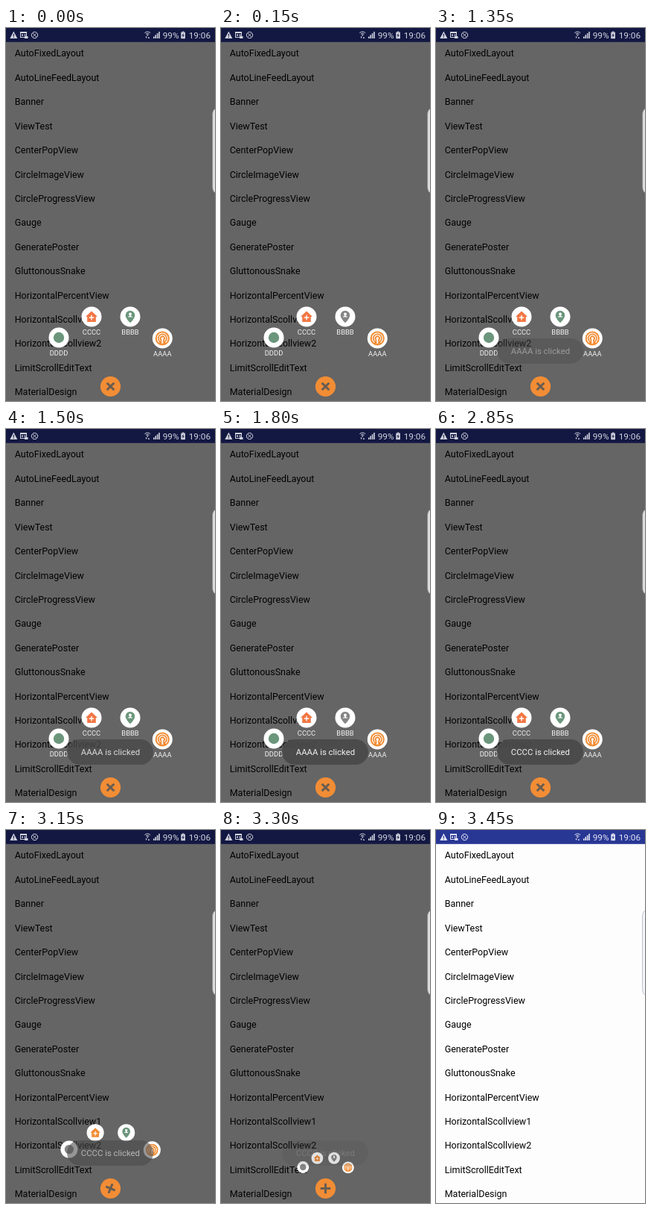
An HTML page with a canvas that plays this animation: 281x500 px, repeating every 3.75 s.

```html
<!DOCTYPE html>
<html lang="en">
<head>
<meta charset="utf-8">
<title>Arc menu</title>
<style>
  html, body { margin: 0; width: 100%; height: 100%; overflow: hidden; background: #666; }
  canvas { display: block; width: 281px; height: 500px; }
</style>
</head>
<body>
<canvas id="stage"></canvas>
<script>
const W = 281, H = 500, LOOP = 3750, TICK = 150;
const FONT = 'Roboto, sans-serif';
const ORANGE = '#f28d35', CORAL = '#f27643', GREEN = '#6b967c', GREY = '#858585';
const ROWS = ['AutoFixedLayout', 'AutoLineFeedLayout', 'Banner', 'ViewTest', 'CenterPopView',
  'CircleImageView', 'CircleProgressView', 'Gauge', 'GeneratePoster', 'GluttonousSnake',
  'HorizontalPercentView', 'HorizontalScollview1', 'HorizontalScollview2',
  'LimitScrollEditText', 'MaterialDesign'];
const HUB = { x: 140.5, y: 480.5 };
const ITEMS = [
  { label: 'DDDD', x: 71, y: 415, icon: drawDot },
  { label: 'CCCC', x: 115, y: 387, icon: drawHouse },
  { label: 'BBBB', x: 167, y: 387, icon: drawPin },
  { label: 'AAAA', x: 210.3, y: 416, icon: drawBroadcast }
];

const canvas = document.getElementById('stage');
const ratio = window.devicePixelRatio || 1;
canvas.width = Math.round(W * ratio);
canvas.height = Math.round(H * ratio);
const ctx = canvas.getContext('2d');

const clamp = v => Math.max(0, Math.min(1, v));
const mix = (a, b, k) => a + (b - a) * k;

function text(str, x, y, size, color, align = 'left') {
  ctx.font = `${size}px ${FONT}`;
  ctx.textAlign = align;
  ctx.fillStyle = color;
  ctx.fillText(str, x, y);
}

function disc(x, y, r, color) {
  ctx.fillStyle = color;
  ctx.beginPath();
  ctx.arc(x, y, r, 0, Math.PI * 2);
  ctx.fill();
}

function arc(x, y, r, from, to) {
  ctx.beginPath();
  ctx.arc(x, y, r, from, to);
  ctx.stroke();
}

function box(x, y, w, h, color) {
  ctx.fillStyle = color;
  ctx.fillRect(x, y, w, h);
}

function polygon(points, color) {
  ctx.fillStyle = color;
  ctx.beginPath();
  points.forEach(([x, y]) => ctx.lineTo(x, y));
  ctx.closePath();
  ctx.fill();
}

function cross(size, width, color) {
  box(-size, -width / 2, size * 2, width, color);
  box(-width / 2, -size, width, size * 2, color);
}

// Item icons are drawn around their own centre.
function drawDot(state) {
  disc(0, 0, 7.2, state.progress < 1 ? GREY : GREEN);
}

function drawHouse(state) {
  const color = state.progress < 1 ? ORANGE : CORAL;
  polygon([[0, -7.5], [8, 0], [5.8, 0], [5.8, 7], [-5.8, 7], [-5.8, 0], [-8, 0]], color);
  ctx.save();
  ctx.translate(0, 1.2);
  cross(3.3, 1.4, '#fff');
  ctx.restore();
}

function drawPin(state) {
  const color = state.greyPin ? GREY : GREEN;
  ctx.fillStyle = color;
  ctx.beginPath();
  ctx.arc(0, -1.8, 6.3, Math.PI * 0.85, Math.PI * 2.15);
  ctx.quadraticCurveTo(4, 4.8, 0, 8.2);
  ctx.quadraticCurveTo(-4, 4.8, -5.6, 1);
  ctx.fill();
  disc(0, -3.6, 1.9, '#fff');
  box(-0.8, -3, 1.6, 3, '#fff');
  ctx.fillStyle = '#fff';
  ctx.beginPath();
  ctx.ellipse(0, 0.4, 3.2, 1.5, 0, Math.PI, 0);
  ctx.fill();
}

function drawBroadcast() {
  disc(0, 0, 9.6, ORANGE);
  ctx.strokeStyle = '#fff';
  ctx.lineWidth = 1.1;
  arc(0, 0, 7, Math.PI * 0.7, Math.PI * 2.3);
  arc(0, 0, 4.2, Math.PI * 0.72, Math.PI * 2.28);
  disc(0, 0, 1.7, '#fff');
  box(-0.9, 1, 1.8, 6, '#fff');
}

function drawStatusBar(open) {
  const bar = open ? '#121842' : '#283694';
  const ink = open ? '#d2d4df' : '#e3e6f5';
  box(0, 0, W, 18.8, bar);

  polygon([[10.3, 4.6], [15.3, 14], [5.3, 14]], ink);
  box(9.7, 7.8, 1.2, 3, bar);
  box(9.7, 11.6, 1.2, 1.2, bar);

  ctx.strokeStyle = ink;
  ctx.lineWidth = 1;
  ctx.strokeRect(19.5, 5.5, 8, 7);
  box(19, 5, 9, 2, ink);
  box(21, 8.5, 2, 2, ink);
  box(24.5, 8.5, 2, 2, ink);
  box(25, 11, 4.5, 3, ink);

  arc(38.5, 9.5, 4.2, 0, Math.PI * 2);
  ctx.beginPath();
  ctx.moveTo(36, 7);
  ctx.lineTo(41, 12);
  ctx.moveTo(36.3, 11.5);
  ctx.lineTo(40.6, 7.5);
  ctx.stroke();

  [5.5, 3.2].forEach(r => arc(190.3, 10.5, r, Math.PI * 1.25, Math.PI * 1.75));
  disc(190.3, 9.6, 1, ink);
  polygon([[187.5, 11.5], [189.8, 11.5], [188.6, 14]], ink);
  polygon([[190.8, 14], [193.1, 14], [191.9, 11.5]], ink);

  for (let i = 0; i < 4; i++) {
    const h = 2.5 + i * 2.2;
    box(198 + i * 2.4, 14 - h, 1.6, h, ink);
  }
  text('99%', 210.7, 13.8, 11.8, ink);
  box(235.3, 5.6, 5.6, 8.6, ink);
  box(236.8, 4.5, 2.6, 1.2, ink);
  polygon([[238.7, 6.8], [236.4, 10.2], [237.9, 10.2], [237.4, 13], [239.8, 9.4], [238.3, 9.4]], bar);
  text('19:06', 245.7, 13.8, 11.8, ink);
}

function drawEdgeHandle(open) {
  ctx.beginPath();
  ctx.moveTo(282, 107.5);
  ctx.quadraticCurveTo(277.6, 110, 277.6, 116);
  ctx.lineTo(277.6, 213);
  ctx.quadraticCurveTo(277.6, 219, 282, 221.5);
  ctx.fillStyle = open ? '#dedede' : '#f5f6fa';
  ctx.fill();
  ctx.strokeStyle = open ? '#8b8b8b' : '#aab0bd';
  ctx.lineWidth = 0.8;
  ctx.stroke();
}

function drawList(open) {
  box(0, 0, W, H, open ? '#656565' : '#fdfdfe');
  ROWS.forEach((row, i) => text(row, 11.7, 38.4 + i * 32.42, 12.49, '#000'));
}

function drawMenu(state) {
  const { progress } = state;
  const scale = mix(0.27, 1, progress);
  for (const item of ITEMS) {
    ctx.save();
    ctx.translate(mix(HUB.x, item.x, progress), mix(HUB.y, item.y, progress));
    ctx.scale(scale, scale);
    disc(0, 0, 13.5, '#fff');
    item.icon(state);
    ctx.restore();
    if (progress === 1) text(item.label, item.x, item.y + 23.6, 9.37, '#f4f4f4', 'center');
  }
  disc(HUB.x, HUB.y, 13.6, ORANGE);
  ctx.save();
  ctx.translate(HUB.x, HUB.y);
  ctx.rotate(state.turn * Math.PI / 4);
  cross(6.8, 3, '#685d52');
  ctx.restore();
}

function drawToast({ toast, opacity }) {
  if (opacity <= 0) return;
  ctx.save();
  ctx.globalAlpha = opacity;
  ctx.fillStyle = 'rgba(74,74,74,0.94)';
  ctx.beginPath();
  ctx.roundRect(82, 416, 116, 34, 17);
  ctx.fill();
  text(`${toast} is clicked`, 140.4, 437.2, 11.35, '#f3f3f3', 'center');
  ctx.restore();
}

function stateAt(time) {
  const t = Math.floor(time / TICK) * TICK;
  const first = t < 2100;
  const fadeIn = first ? clamp((t - 1200) / 350) : clamp((t - 2025) / 150);
  const fadeOut = first ? clamp((2025 - t) / 150) : clamp((3360 - t) / 340);
  return {
    open: t < 3450,
    progress: 1 - 0.565 * Math.pow(clamp((t - 3000) / 300), 1.5),
    turn: 1 - clamp((t - 3000) / 300),
    greyPin: (t >= 150 && t < 1350) || (t >= 1800 && t < 2250) || t >= 3300,
    toast: first ? 'AAAA' : 'CCCC',
    opacity: Math.min(fadeIn, fadeOut)
  };
}

function draw(time) {
  const state = stateAt(time);
  ctx.setTransform(canvas.width / W, 0, 0, canvas.height / H, 0, 0);
  drawList(state.open);
  drawStatusBar(state.open);
  drawEdgeHandle(state.open);
  if (state.open) {
    drawMenu(state);
    drawToast(state);
  }
}

const start = performance.now();
function frame() {
  draw((performance.now() - start) % LOOP);
  requestAnimationFrame(frame);
}
frame();
</script>
</body>
</html>
```
